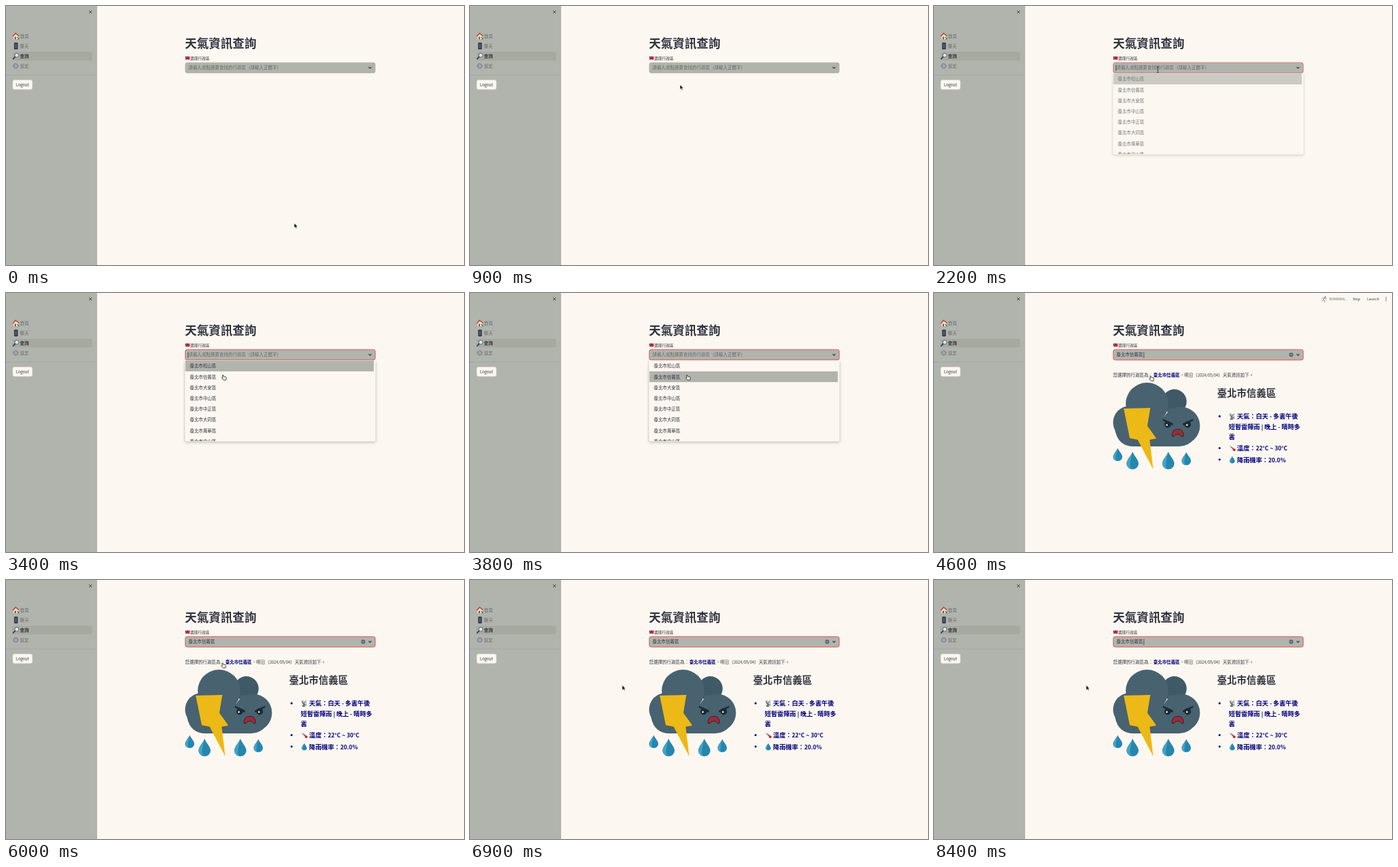
Recreate the animation shown at these times as an HTML page. Size 688 by 390 pixels, loop 8600 ms.

```html
<!DOCTYPE html>
<html lang="zh-Hant-TW">
<head>
<meta charset="utf-8">
<title>天氣資訊查詢</title>
<style>
  html, body { margin: 0; width: 100%; height: 100%; overflow: hidden; background: #fcf7f0; }
  svg { display: block; width: 688px; height: 390px; }
  text { font: 6.65px "Noto Sans CJK TC", "Noto Sans CJK", "Noto Sans", sans-serif; fill: #31333f; white-space: pre; }
  .bold { font-weight: 700; }
  .soft { fill: #666a6b; }
  .navy { fill: #00007d; font-weight: 700; }
  .latin { font-size: 5.95px; }
  .tiny { font-size: 5.2px; }
  .facts text { font-size: 9.4px; }
  .facts .n { font-size: 8.6px; }
  .line { fill: none; stroke: #31333f; stroke-linecap: round; stroke-linejoin: round; }
  [data-on] { visibility: hidden; }
</style>
</head>
<body>
<svg viewBox="0 0 688 390">
  <defs>
    <filter id="shadow" x="-10%" y="-10%" width="120%" height="125%">
      <feDropShadow dx="0" dy="1.5" stdDeviation="2" flood-color="#000" flood-opacity=".28"/>
    </filter>
    <linearGradient id="edge"><stop offset="0" stop-color="#b1b4ad"/><stop offset="1" stop-color="#a5a8a1"/></linearGradient>
    <clipPath id="listClip"><rect x="269" y="101" width="286" height="122"/></clipPath>
    <g id="drop">
      <path d="M0-13C2-7 9-1 9 5A9 8.6 0 0 1-9 5C-9-1-2-7 0-13Z" fill="#2587ae"/>
      <path d="M0-13C-2-7-9-1-9 5A9 8.6 0 0 0-2 13C-6 7-2-3 0-13Z" fill="#45a3c6"/>
    </g>
  </defs>

  <rect width="688" height="390" fill="#fcf7f0"/>

  <!-- sidebar -->
  <rect width="136.5" height="390" fill="#b1b4ad"/>
  <rect x="134.5" width="2" height="390" fill="url(#edge)"/>
  <path class="line" d="M125 7l3.8 3.8M128.800 7l-3.800 3.800" stroke-width=".9"/>
  <rect x="10" y="69" width="119.500" height="13" rx="2" fill="#a7a89f"/>
  <path d="M0 104H136" stroke="#a0a39d" stroke-width=".8"/>
  <g class="soft">
    <text class="soft" x="21" y="47.900">首頁</text>
    <text class="soft" x="21" y="62.900">聊天</text>
    <text class="bold" x="21" y="77.800">查詢</text>
    <text class="soft" x="21" y="92.800">設定</text>
  </g>
  <g>
    <path d="M11.500 45.500L15 42l4 3.500V50h-7.500Z" fill="#efe2cc"/>
    <path d="M10.300 45.500L14.500 41l5.200 4.500" fill="none" stroke="#b8452f" stroke-width="1.600"/>
    <path d="M13 46.500h2V50h-2z" fill="#8a4c2c"/>
    <path d="M16 46.500h2v1.600h-2z" fill="#5d9cc0"/>
    <circle cx="18.800" cy="49" r="1.400" fill="#4c8a42"/>
  </g>
  <rect x="12.200" y="55.300" width="5.600" height="10" rx="1" fill="#26282d"/>
  <rect x="13" y="56.500" width="4" height="7.400" fill="#4b5368"/>
  <path d="M10.700 79.600l3.600-3.600" stroke="#3a3a3c" stroke-width="1.800" stroke-linecap="round"/>
  <circle cx="16.200" cy="74.200" r="3" fill="#dbe7ea" stroke="#595c60" stroke-width=".9"/>
  <circle cx="14.600" cy="90.300" r="3.500" fill="none" stroke="#7c8490" stroke-width="1.500" stroke-dasharray="1.500 .7"/>
  <circle cx="14.600" cy="90.300" r="2.500" fill="#b9bec6" stroke="#767e8a" stroke-width=".9"/>
  <circle cx="14.600" cy="90.300" r=".8" fill="#666e79"/>
  <rect x="10" y="111.200" width="29.700" height="14.600" rx="3" fill="#fcf7f0" stroke="#c9c8c2" stroke-width=".6"/>
  <text class="latin" x="15" y="120.800">Logout</text>

  <!-- toolbar -->
  <g data-on="4300-4700">
    <g data-fade="4300" opacity=".45">
      <g class="line" stroke-width=".9" style="stroke:#80818a">
        <circle cx="587.500" cy="6" r=".8"/>
        <path d="M583 8l2.500-1 2 1.200 2 .8M586.500 7.500L585 10.300l2.300 1.200-.5 2M585 10.300L582.500 12"/>
      </g>
      <text class="tiny soft" x="594" y="10.900">RUNNING...</text>
    </g>
    <text class="tiny" x="629" y="10.900">Stop</text>
    <text class="tiny" x="650.700" y="10.900">Launch</text>
    <path d="M679 6.600v0M679 9v0M679 11.400v0" class="line" stroke-width="1.300"/>
  </g>

  <!-- query form -->
  <text class="bold" x="268.800" y="62.800" style="font-size:17.900px">天氣資訊查詢</text>
  <path d="M269.500 76h6.500v4.800h-6.500z" fill="#d3243c"/>
  <path d="M269.500 76h3.200v2.500h-3.200z" fill="#232f85"/>
  <circle cx="271.100" cy="77.200" r=".6" fill="#fff"/>
  <text x="276.800" y="80.600" style="font-size:5.800px">選擇行政區</text>
  <rect x="269.300" y="85.200" width="285.400" height="15.700" rx="3" fill="#b1b4ad" stroke="#a8aba4" stroke-width=".5"/>
  <rect data-on="2200-8600" data-fade="2200" x="269.300" y="85.200" width="285.400" height="15.700" rx="3" fill="none" stroke="#ef4f50" stroke-width=".9"/>
  <text class="soft" data-on="0-4300" x="274" y="95.400">請輸入或點選要查找的行政區（請輸入正體字）</text>
  <text data-on="4300-8600" x="274" y="95.400">臺北市信義區</text>
  <g data-on="4300-8600">
    <circle cx="536.600" cy="93" r="3.200" fill="#646877"/>
    <path d="M535.500 91.900l2.200 2.200M537.700 91.900l-2.200 2.200" stroke="#b1b4ad" stroke-width=".7"/>
  </g>
  <path class="line" d="M545 92.200l1.800 1.800 1.800-1.800" stroke-width="1.100"/>
  <path data-on="2200-2700 3200-3800" d="M273.300 89v9" stroke="#31333f" stroke-width=".8"/>
  <path data-on="4300-4800 5300-5800 6400-6900 7400-7900 8400-8600" d="M315.200 89v9" stroke="#31333f" stroke-width=".8"/>

  <!-- option list -->
  <g data-on="2200-4300" data-fade="2200">
    <rect x="269" y="101.500" width="286" height="121.800" rx="2" fill="#fcf7f0" filter="url(#shadow)"/>
    <rect id="mark" x="269.500" width="283" height="16.200" fill="#b1b4ad"/>
    <g id="list" clip-path="url(#listClip)"></g>
  </g>

  <!-- answer -->
  <g data-on="4300-8600">
    <text x="269" y="126">您選擇的行政區為：</text>
    <text class="navy" x="329.400" y="126">臺北市信義區</text>
    <text x="369.400" y="126">，明日（<tspan class="latin">2024/05/04</tspan>）天氣資訊如下。</text>
  </g>
  <g data-on="4500-8600">
    <g fill="#486270">
      <circle cx="361" cy="163.500" r="18.500" fill="#405966"/>
      <circle cx="320" cy="167" r="32"/>
      <circle cx="294" cy="195" r="25"/>
      <circle cx="371" cy="200" r="28.500"/>
      <path d="M277 186h75v-12l20-2 18 48q-8 11-22 11H300q-23 0-28-24Z"/>
    </g>
    <path d="M285 174L325 173 320.500 200 334 219 324 221 329.300 265.500 306 221 294 218.500Z" fill="#ecb916"/>
    <g fill="#1c2b35">
      <circle cx="351" cy="198" r="5"/><circle cx="381" cy="198" r="5"/>
      <path d="M344 189.500l15.500 7-1 3-15-7.500ZM389 189.500l-15.500 7 1 3 15-7.500Z"/>
    </g>
    <circle cx="349.800" cy="198.800" r="1.300" fill="#fff"/><circle cx="380" cy="198.800" r="1.300" fill="#fff"/>
    <path d="M357.500 215.500q0-10.500 8.700-10.500t8.700 10.500q-3 2-4-1-4.700-4-9.400 0-1 3-4 1Z" fill="#a02a33" stroke="#33222b" stroke-width="1"/>
    <use href="#drop" transform="translate(276 243) scale(.77 .74)"/>
    <use href="#drop" transform="translate(298.300 252)"/>
    <use href="#drop" transform="translate(352 252)"/>
    <use href="#drop" transform="translate(379 249.200) scale(.77 .74)"/>

    <text class="bold" x="425.300" y="156.300" style="font-size:14.750px">臺北市信義區</text>
    <g class="facts">
      <g fill="#00007d"><circle cx="429" cy="185.700" r="1.600"/><circle cx="429" cy="233.500" r="1.600"/><circle cx="429" cy="250.800" r="1.600"/></g>
      <text class="navy" x="455.300" y="189.300">天氣：白天<tspan class="n"> - </tspan>多雲午後</text>
      <text class="navy" x="442.800" y="204.500">短暫雷陣雨<tspan class="n"> | </tspan>晚上<tspan class="n"> - </tspan>晴時多</text>
      <text class="navy" x="442.800" y="219.600">雲</text>
      <text class="navy" x="455.300" y="237.200">溫度：<tspan class="n">22°C ~ 30°C</tspan></text>
      <text class="navy" x="455.300" y="254.500">降雨機率：<tspan class="n">20.0%</tspan></text>
      <path d="M444 181q0 8 8 8.500ZM446 187l-1.500 4h5l-1-3Z" fill="#74787e"/>
      <path d="M444 181l8 8.500q1-3-2-6t-6-2.500Z" fill="#c3c6c8"/>
      <path d="M448 185l3.500-3.500" stroke="#55585d" stroke-width="1"/>
      <path d="M445 230.500l5.500 5.200" stroke="#cdcfd1" stroke-width="2.400" stroke-linecap="round"/>
      <path d="M446.500 232l4 3.700" stroke="#c7232d" stroke-width="1.200"/>
      <circle cx="451" cy="236.200" r="1.900" fill="#c7232d"/>
      <use href="#drop" transform="translate(448 251) scale(.43 .4)"/>
    </g>
  </g>

  <!-- pointer -->
  <g id="pointer">
    <path data-kind="arrow" d="M0 0V7.200L1.700 5.700 2.800 8.300 4 7.800 2.900 5.300H5.200Z" fill="#000" stroke="#fff" stroke-width=".6"/>
    <path data-kind="beam" d="M-1.500-4.300Q0-4.300 0-3.300Q0-4.300 1.500-4.300M0-3.300V3.300M-1.500 4.300Q0 4.300 0 3.300Q0 4.300 1.500 4.300" fill="none" stroke="#222" stroke-width=".8"/>
    <path data-kind="hand" d="M-1.800-3.200q.9-1 1.500.2L.2-1.200l3 .7q1 .3.800 1.600L3.400 4H-.3L-2.600 1.300q-.3-1 .8-.8l.6.400Z" fill="#fff" stroke="#111" stroke-width=".8"/>
  </g>
</svg>
<script>
  const LOOP = 8600, STEP = 100;
  const $ = id => document.getElementById(id);
  const all = sel => [...document.querySelectorAll(sel)];

  [...'松山 信義 大安 中山 中正 大同 萬華 文山'.split(' ')].forEach((name, i) => {
    const row = document.createElementNS('http://www.w3.org/2000/svg', 'text');
    row.setAttribute('x', 276);
    row.setAttribute('y', 112.3 + 16.2 * i);
    row.textContent = `臺北市${name}區`;
    $('list').append(row);
  });

  // time, x, y, shape
  const path = [
    [0, 433, 327, 'arrow'], [100, 430, 318, 'arrow'], [300, 403, 261, 'arrow'],
    [500, 360, 188, 'arrow'], [700, 333, 142, 'arrow'], [900, 315.500, 118.500, 'arrow'],
    [1200, 326, 111, 'arrow'], [1500, 328, 109, 'arrow'], [1700, 333, 101, 'beam'],
    [1900, 336.300, 96, 'beam'], [2900, 336.300, 96, 'beam'], [3100, 333, 108, 'hand'],
    [3400, 327, 127, 'hand'], [4200, 327, 127, 'hand'], [4300, 326.300, 128.300, 'hand'],
    [6000, 326.300, 128.300, 'hand'], [6100, 320, 129, 'arrow'], [6400, 272, 143, 'arrow'],
    [6800, 228.700, 158.500, 'arrow'], [LOOP, 228.700, 158.500, 'arrow']
  ];

  const timed = all('[data-on]').map(el => ({
    el, spans: el.dataset.on.split(' ').map(s => s.split('-').map(Number))
  }));
  const fades = all('[data-fade]').map(el => ({ el, at: +el.dataset.fade }));
  const shapes = all('[data-kind]');

  function movePointer(t) {
    const i = path.findIndex((p, k) => t >= p[0] && t < path[k + 1][0]);
    const [t0, x0, y0, kind] = path[i], [t1, x1, y1] = path[i + 1];
    const k = (t - t0) / (t1 - t0);
    $('pointer').setAttribute('transform', `translate(${x0 + (x1 - x0) * k} ${y0 + (y1 - y0) * k})`);
    for (const s of shapes) s.style.display = s.dataset.kind === kind ? '' : 'none';
  }

  function draw(t) {
    for (const { el, spans } of timed)
      el.style.visibility = spans.some(([a, b]) => t >= a && t < b) ? 'visible' : 'hidden';
    for (const { el, at } of fades) el.setAttribute('opacity', t < at + STEP ? .65 : 1);
    $('mark').setAttribute('y', t < 3500 ? 101.8 : 118);
    movePointer(t);
  }

  const start = performance.now();
  function tick() {
    draw(Math.floor((performance.now() - start) / STEP) * STEP % LOOP);
    requestAnimationFrame(tick);
  }
  tick();
</script>
</body>
</html>
```
